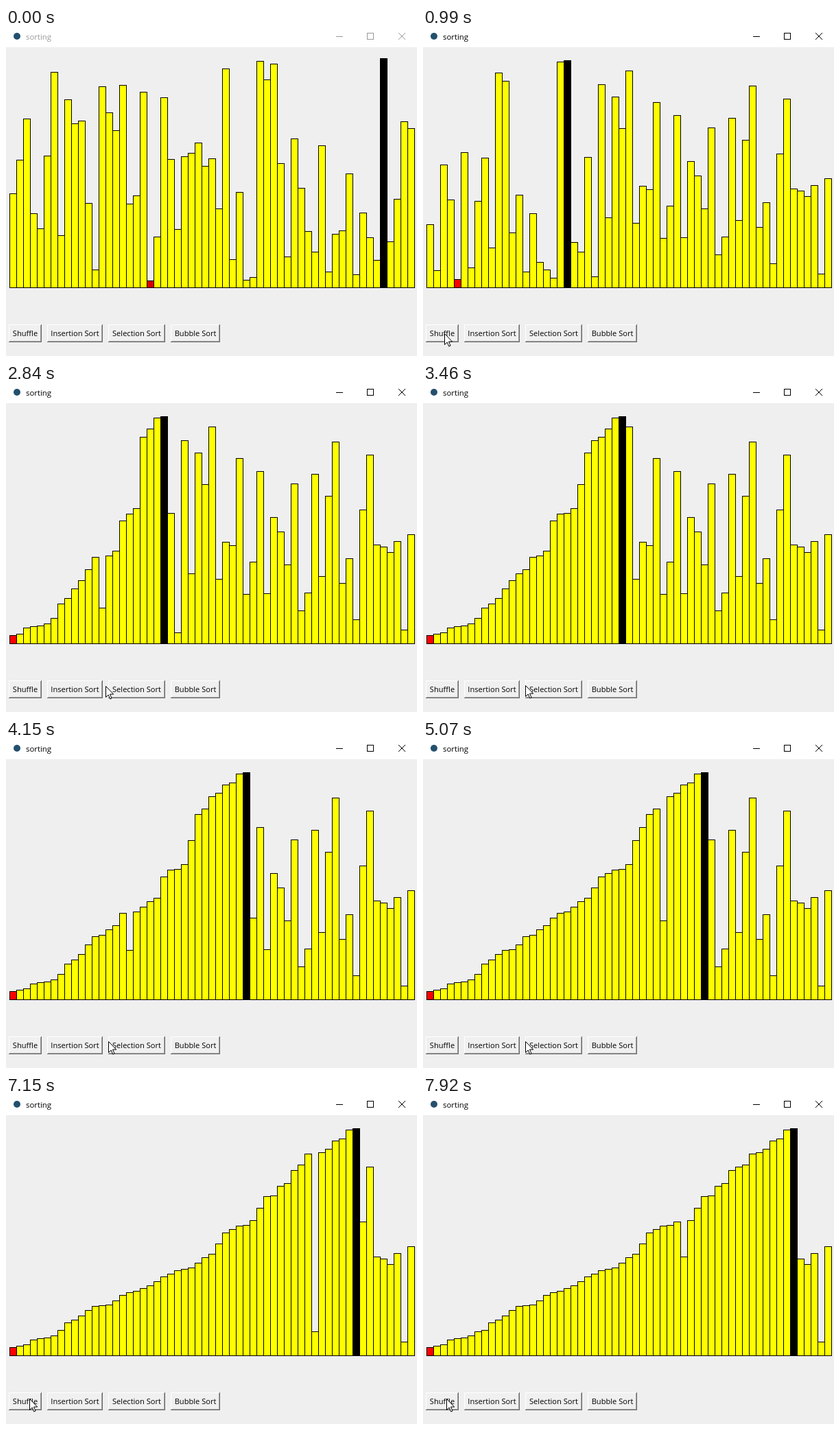
An HTML page with a canvas that plays this animation: 599x478 px, repeating every 7990 ms.

```html
<!DOCTYPE html>
<html lang="en">
<head>
<meta charset="utf-8">
<title>sorting</title>
<style>
html, body { margin: 0; width: 100%; height: 100%; overflow: hidden; background: #efefef; }
canvas { display: block; }
</style>
</head>
<body>
<canvas id="stage" width="599" height="478"></canvas>
<script>
const ctx = document.getElementById('stage').getContext('2d');
const LOOP = 7990, BASE = 378;
const ACTIVE = 770, SHUFFLED = 920;

// Top edge of each bar, left to right
const before = [
  241, 192, 132, 270, 292, 186, 64, 302, 104, 139, 135, 255, 352, 85, 123, 149, 83, 256, 244, 93,
  368, 304, 101, 191, 293, 187, 182, 167, 201, 190, 263, 59, 337, 239, 367, 363, 48, 75, 52, 197,
  333, 161, 233, 296, 326, 171, 355, 300, 295, 212, 359, 269, 305, 338, 44, 311, 249, 136, 146];
const shuffled = [
  286, 353, 199, 250, 366, 181, 349, 252, 189, 320, 65, 77, 298, 243, 355, 270, 341, 352, 364, 49,
  47, 312, 326, 188, 362, 82, 276, 100, 146, 62, 284, 230, 235, 108, 306, 259, 127, 305, 194, 215,
  263, 145, 330, 304, 131, 280, 163, 84, 290, 254, 343, 183, 103, 234, 237, 245, 229, 358, 219];

const buttons = [
  { label: 'Shuffle', x: 4, w: 48, down: 770, up: 920 },
  { label: 'Insertion Sort', x: 60, w: 81, down: 1450, up: 1610 },
  { label: 'Selection Sort', x: 149, w: 83 },
  { label: 'Bubble Sort', x: 240, w: 72 }];

// Pointer stops: time, x, y
const path = [
  [0, 48, 480], [70, 46, 470], [690, 31, 442], [920, 31, 445], [1300, 90, 448], [2380, 90, 448],
  [2840, 145, 440], [3230, 146, 440], [3460, 149, 439], [5990, 149, 439], [6610, 38, 445], [6840, 34, 441]];

// The screen refreshes 13 times a second, on a 10 ms clock
function snap(t) {
  const k = Math.ceil((Math.floor(t / 10) + 0.85) / 7.69) - 1;
  return 10 * Math.floor(7.69 * k + 0.15) * (k > 0);
}

function insertionSort(list, swaps) {
  const a = list.slice();
  for (let i = 1; i < a.length; i++) {
    for (let j = i; j > 0 && a[j] > a[j - 1]; j--) {
      if (swaps-- <= 0) return a;
      [a[j], a[j - 1]] = [a[j - 1], a[j]];
    }
  }
  return a;
}

function rect(color, x, y, w, h) {
  ctx.fillStyle = color;
  ctx.fillRect(x, y, w, h);
}

function text(str, x, y, size, color, align) {
  ctx.font = `${size}px "Open Sans", "Noto Sans", sans-serif`;
  ctx.textAlign = align;
  ctx.fillStyle = color;
  ctx.fillText(str, x, y);
}

function drawTitleBar(color) {
  rect('#fff', 0, 0, 599, 28);
  ctx.fillStyle = '#24506e';
  ctx.beginPath();
  ctx.arc(16, 12, 5, 0, 7);
  ctx.fill();
  text('sorting', 29, 17, 11.4, color, 'left');
  rect(color, 481, 12, 10, 1);
  ctx.strokeStyle = color;
  ctx.lineWidth = 1;
  ctx.strokeRect(526.5, 7.5, 9, 9);
  ctx.beginPath();
  ctx.moveTo(572, 7);
  ctx.lineTo(582, 17);
  ctx.moveTo(582, 7);
  ctx.lineTo(572, 17);
  ctx.stroke();
}

function drawBars(tops, minColor) {
  const min = Math.max(...tops), max = Math.min(...tops);
  tops.forEach((y, i) => {
    const x = 5 + 10 * i;
    rect('#000', x, y, 11, BASE + 1 - y);
    rect(y === min ? minColor : y === max ? '#000' : '#ff0', x + 1, y + 1, 9, BASE - 1 - y);
  });
}

function drawButton({ label, x, w, down, up }, t) {
  const y = 432, h = 26, pressed = t >= down && t < up;
  const [outer, inner, edge, shade] = pressed
    ? ['#696969', '#a0a0a0', '#fff', '#e3e3e3']
    : ['#fff', '#f0f0f0', '#696969', '#a0a0a0'];
  rect(edge, x, y, w, h);
  rect(outer, x, y, w - 1, h - 1);
  rect(shade, x + 1, y + 1, w - 2, h - 2);
  rect(inner, x + 1, y + 1, w - 3, h - 3);
  rect('#f0f0f0', x + 2, y + 2, w - 4, h - 4);
  text(label, x + w / 2 + pressed, 449 + pressed, 11.1, '#000', 'center');
}

function pointerAt(t) {
  const i = path.findIndex(p => p[0] > t);
  if (i < 0) return path[path.length - 1].slice(1);
  const [t0, x0, y0] = path[i - 1], [t1, x1, y1] = path[i];
  const f = (t - t0) / (t1 - t0);
  return [x0 + (x1 - x0) * f, y0 + (y1 - y0) * f].map(Math.round);
}

const arrow = new Path2D('M0 0V16L3.7 12.5L6.3 18.5L8.6 17.5L6 11.6H11.2Z');

function drawPointer(x, y) {
  ctx.save();
  ctx.translate(x + 0.5, y + 0.5);
  ctx.fillStyle = '#fff';
  ctx.strokeStyle = '#000';
  ctx.fill(arrow);
  ctx.stroke(arrow);
  ctx.restore();
}

function frame() {
  const t = snap(performance.now() % LOOP);
  rect('#efefef', 0, 0, 599, 478);
  drawTitleBar(t < ACTIVE ? '#999' : '#000');
  if (t < SHUFFLED) drawBars(before, '#d80000');
  else drawBars(insertionSort(shuffled, Math.floor(0.0985 * (t - 1770) + 15.45)), '#f00');
  buttons.forEach(b => drawButton(b, t));
  drawPointer(...pointerAt(t));
  requestAnimationFrame(frame);
}
frame();
</script>
</body>
</html>
```
